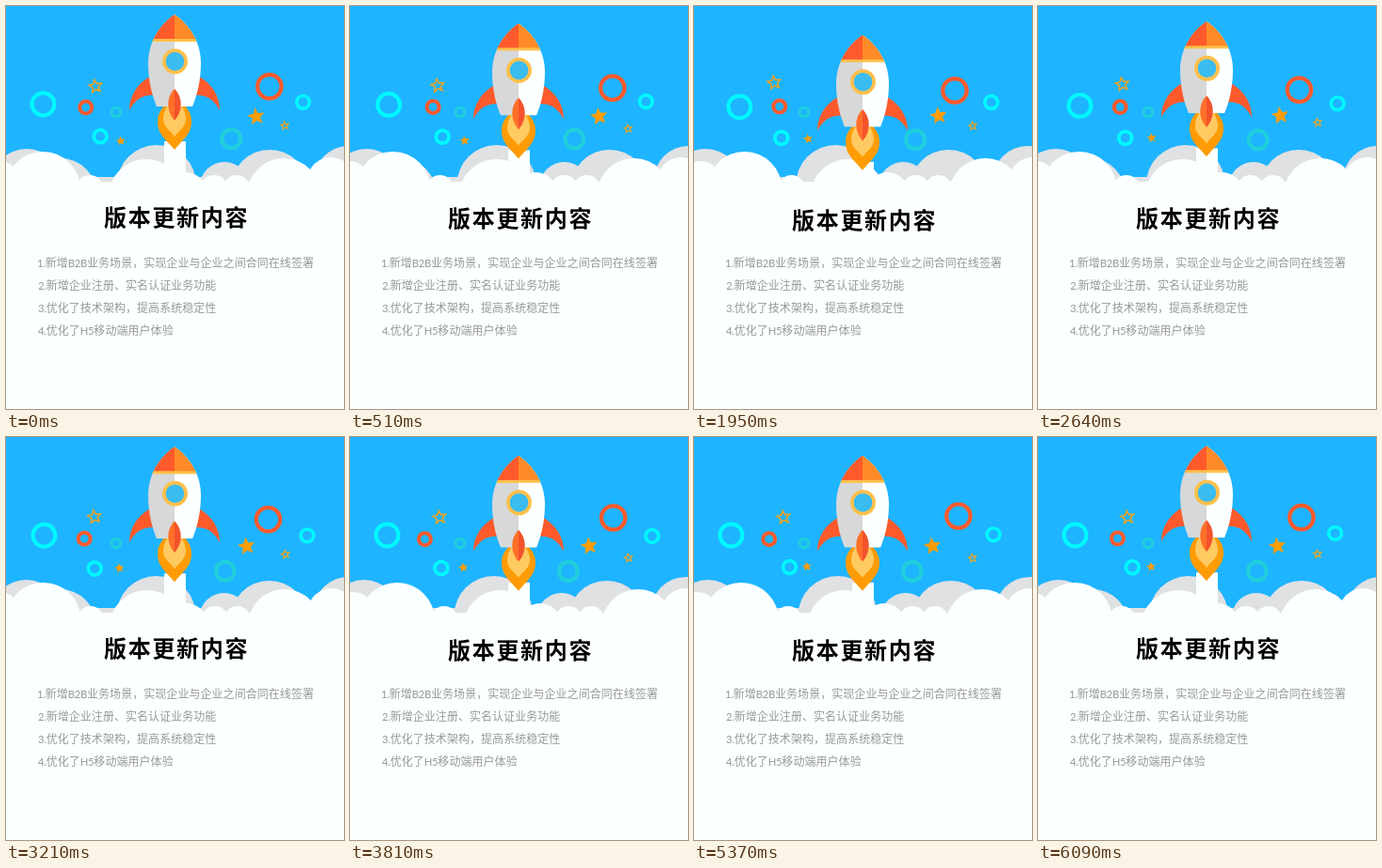
An HTML page for the animation above (6120 ms loop, 359 by 429 pixels).

```html
<!DOCTYPE html>
<html lang="zh-CN">
<head>
<meta charset="utf-8">
<title>版本更新内容</title>
<style>
  html, body { margin: 0; width: 100%; height: 100%; overflow: hidden; background: #fbffff; }
  svg { display: block; width: 359px; height: 429px; }
  .title { font: 700 24px "Noto Sans CJK SC", "Noto Sans CJK", sans-serif; letter-spacing: 1.7px; fill: #000; }
  .notes { font: 500 12px "Noto Sans CJK SC", "Noto Sans CJK", sans-serif; letter-spacing: .05px; fill: #979999; }
  .latin { font: 11.3px Lato, sans-serif; letter-spacing: -.3px; }
  .white { fill: #fbffff; }
  .gray { fill: #e0e1e3; }
</style>
</head>
<body>
<svg viewBox="0 0 359 429">
  <defs>
    <clipPath id="hull">
      <path d="M0 0C20 14 28 34 28 52C28 70 24 86 19 98H-19C-24 86 -28 70 -28 52C-28 34 -20 14 0 0Z"/>
    </clipPath>
    <path id="fin" fill="#ff5a2c" d="M-26 66C-40 74 -48 87 -48 102C-43 92 -35 85 -22 86Z"/>
  </defs>

  <rect width="359" height="429" class="white"/>
  <rect width="359" height="190" fill="#1eb4ff"/>
  <g id="decor"></g>

  <g id="back" class="gray">
    <rect x="-20" y="182" width="400" height="12"/>
    <circle cx="12" cy="190" r="38"/>
    <circle cx="48" cy="200" r="38"/>
    <circle cx="150" cy="190" r="42"/>
    <circle cx="222" cy="192" r="26"/>
    <circle cx="270" cy="194" r="41"/>
    <circle cx="354" cy="186" r="37"/>
  </g>

  <g id="front" class="white">
    <rect x="-20" y="187" width="400" height="242"/>
    <circle cx="8" cy="185" r="20"/>
    <circle cx="54" cy="195" r="40"/>
    <circle cx="104" cy="194" r="14"/>
    <circle cx="164" cy="203" r="40"/>
    <circle cx="206" cy="199" r="22"/>
    <circle cx="236" cy="195" r="15"/>
    <circle cx="260" cy="194" r="14"/>
    <circle cx="310" cy="201" r="39"/>
    <circle cx="360" cy="186" r="25"/>
  </g>

  <g id="rocket">
    <rect x="-11" y="135" width="23" height="60" class="white"/>
    <path fill="#ff9c05" d="M0 144C-8 134 -18 128 -18 114C-18 104 -12 98 -8 95H8C12 98 18 104 18 114C18 128 8 134 0 144Z"/>
    <path fill="#ffca62" d="M0 130C-5 123 -12 120 -12 111C-12 104 -8 98 -6 95H6C8 98 12 104 12 111C12 120 5 123 0 130Z"/>
    <use href="#fin"/>
    <use href="#fin" transform="scale(-1 1)"/>
    <g clip-path="url(#hull)">
      <rect x="-30" width="30" height="100" fill="#d7d8d9"/>
      <rect width="30" height="100" fill="#fbffff"/>
      <rect x="-30" width="30" height="27" fill="#ff5a2c"/>
      <rect width="30" height="27" fill="#ff8a28"/>
      <rect x="-30" y="26" width="60" height="3" fill="#ffc04a"/>
    </g>
    <circle cx=".5" cy="50" r="11.7" fill="#3abcf0" stroke="#ffc04a" stroke-width="3.6"/>
    <path fill="#ff7029" d="M0 79C-9 88 -9 103 0 113Z"/>
    <path fill="#f3532c" d="M0 79C9 88 9 103 0 113Z"/>
  </g>

  <text id="title" class="title" x="104" y="234.3">版本更新内容</text>
  <g class="notes">
    <text x="33" y="277.5"><tspan class="latin">1.</tspan>新增<tspan class="latin">B2B</tspan>业务场景，实现企业与企业之间合同在线签署</text>
    <text x="34" y="301.5"><tspan class="latin">2.</tspan>新增企业注册、实名认证业务功能</text>
    <text x="34" y="325.5"><tspan class="latin">3.</tspan>优化了技术架构，提高系统稳定性</text>
    <text x="34" y="349.5"><tspan class="latin">4.</tspan>优化了<tspan class="latin">H5</tspan>移动端用户体验</text>
  </g>
</svg>

<script>
  const LOOP = 6120, BOB = LOOP / 2, STEP = 30;
  const CYAN = "#00f8ff", TEAL = "#20cfdc", RED = "#ff5a2c";
  const { PI, sin, cos } = Math;
  const $ = id => document.getElementById(id);

  const move = (el, x, y) => el.setAttribute("transform", `translate(${x.toFixed(2)} ${y.toFixed(2)})`);

  function shape(tag, attrs) {
    const el = document.createElementNS("http://www.w3.org/2000/svg", tag);
    for (const name in attrs) el.setAttribute(name, attrs[name]);
    return $("decor").appendChild(el);
  }

  const ring = (r, width, stroke) =>
    shape("circle", { r: r - width / 2, fill: "none", stroke, "stroke-width": width });

  function star(r, line) {
    const points = Array.from({ length: 10 }, (_, i) => {
      const a = i * PI / 5 - PI / 2 - .15, d = i % 2 ? r * .45 : r;
      return `${(d * cos(a)).toFixed(2)},${(d * sin(a)).toFixed(2)}`;
    }).join(" ");
    return shape("polygon", line
      ? { points, fill: "none", stroke: "#f5a21b", "stroke-width": line }
      : { points, fill: "#ff9d05" });
  }

  // Drift rules: a cosine with its crest at the given time, or one swing out and back.
  const wave = (crest, cycle = LOOP) => t => cos(2 * PI * (t - crest) / cycle);
  const swing = t => t < 3600 ? sin(PI * t / 3600) ** 2 : 0;

  // Each part: element, home x and y, reach x and y, drift rule.
  const decor = [
    [ring(14, 4.2, CYAN), 39.5, 104.5, 9, 3, swing],
    [ring(8.5, 4, RED), 84.5, 108, 7, -1, wave(1500)],
    [ring(6.3, 3, TEAL), 117, 113, 0, 0, swing],
    [ring(8.8, 3.8, CYAN), 97, 139.5, -4.5, 1, wave(2300)],
    [ring(12, 4.2, TEAL), 236, 142, 4.5, -1, wave(-1500, 2 * LOOP)],
    [ring(14.8, 4.2, RED), 279, 87, -2, 3, wave(1950)],
    [ring(8.7, 3.7, CYAN), 317.5, 103.5, 3.5, 2, wave(4000)],
    [star(7.2, 1.5), 95, 85.5, -10, -4, swing],
    [star(5.2), 121, 141, 1, 3, wave(-800, 2 * LOOP)],
    [star(9.6), 260, 117, 7, 1, wave(-1200, 2 * LOOP)],
    [star(4.4, 1.2), 296, 128, -1, 4, wave(1000, 3600)]
  ];

  function draw(t) {
    const depth = t < BOB ? 25 : 18;
    const part = ((1 + cos(2 * PI * t / BOB)) / 2) ** 2;
    move($("rocket"), 179, 9 + depth * Math.abs(sin(PI * t / BOB)) ** 1.4);
    move($("front"), -15 * part, 0);
    move($("back"), 10 * part, 0);
    move($("title"), 0, 1.5 * (1 - cos(2 * PI * t / BOB)));
    for (const [el, x, y, dx, dy, drift] of decor) {
      const d = drift(t);
      move(el, x + dx * d, y + dy * d);
    }
  }

  const start = performance.now();
  function tick() {
    const t = (performance.now() - start) % LOOP;
    draw(Math.floor(t / STEP) * STEP);
    requestAnimationFrame(tick);
  }
  tick();
</script>
</body>
</html>
```
